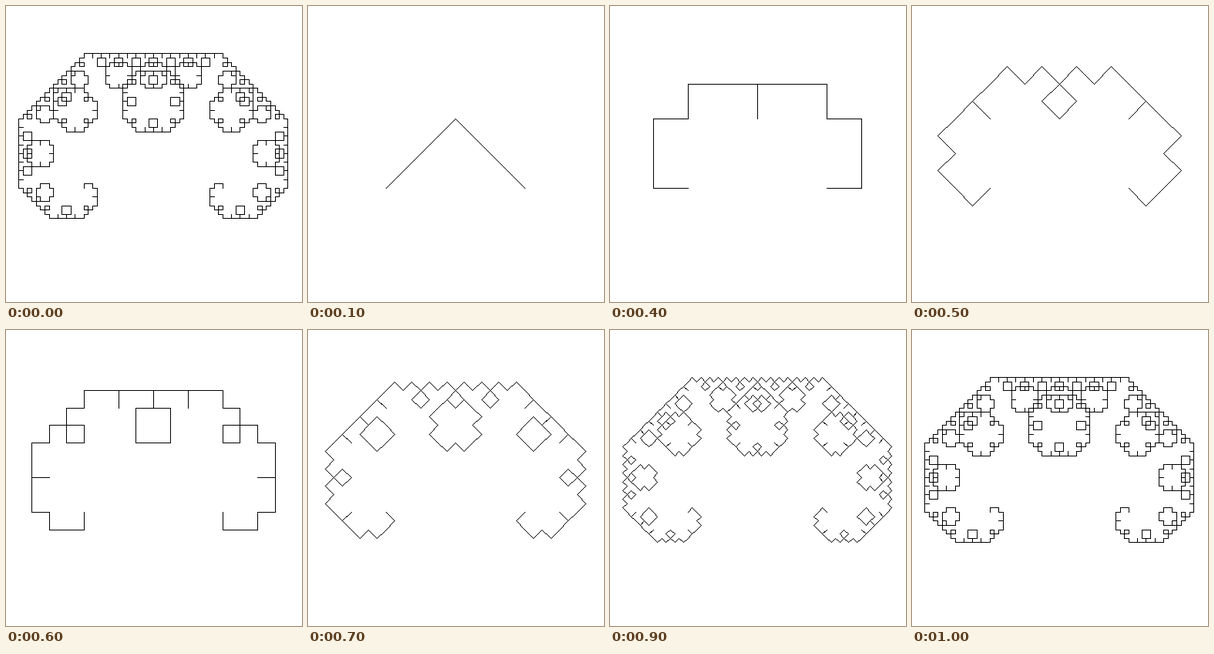
An HTML page with a canvas for the animation above (1.1 s loop, 384 px wide and 384 px high).

```html
<!DOCTYPE html>
<html lang="en">
<head>
<meta charset="utf-8">
<title>C curve</title>
<style>
html, body { margin: 0; width: 100%; height: 100%; overflow: hidden; background: #fff; }
canvas { display: block; width: 384px; height: 384px; }
</style>
</head>
<body>
<canvas id="stage" width="384" height="384"></canvas>
<script>
const ctx = document.getElementById('stage').getContext('2d');
const STEP = 100, ORDERS = 10, LOOP = 1100;
const START = [101.15, 236.5], END = [281.45, 236.5];

// Each segment becomes two sides of a right isosceles triangle.
function refine(points) {
  const out = [points[0]];
  for (let i = 1; i < points.length; i++) {
    const [x0, y0] = points[i - 1], [x1, y1] = points[i];
    out.push([(x0 + x1 + y1 - y0) / 2, (y0 + y1 - x1 + x0) / 2], points[i]);
  }
  return out;
}

// One pixel wide line without smoothing.
function line(x, y, x1, y1) {
  const dx = Math.abs(x1 - x), dy = -Math.abs(y1 - y);
  const sx = Math.sign(x1 - x), sy = Math.sign(y1 - y);
  let err = dx + dy;
  while (true) {
    ctx.fillRect(x, y, 1, 1);
    if (x === x1 && y === y1) return;
    const e = 2 * err;
    if (e >= dy) { err += dy; x += sx; }
    if (e <= dx) { err += dx; y += sy; }
  }
}

const curves = [[START, END]];
for (let n = 1; n <= ORDERS; n++) curves.push(refine(curves[n - 1]));

function draw(order) {
  ctx.fillStyle = '#fff';
  ctx.fillRect(0, 0, 384, 384);
  ctx.fillStyle = '#000';
  const p = curves[order].map(([x, y]) => [Math.floor(x + 1e-6), Math.floor(y + 1e-6)]);
  for (let i = 1; i < p.length; i++) line(...p[i - 1], ...p[i]);
}

let shown = -1;
const begin = performance.now();
function tick() {
  const t = (performance.now() - begin) % LOOP;
  const order = Math.floor(t / STEP) || ORDERS;
  if (order !== shown) draw(shown = order);
  requestAnimationFrame(tick);
}
tick();
</script>
</body>
</html>
```
